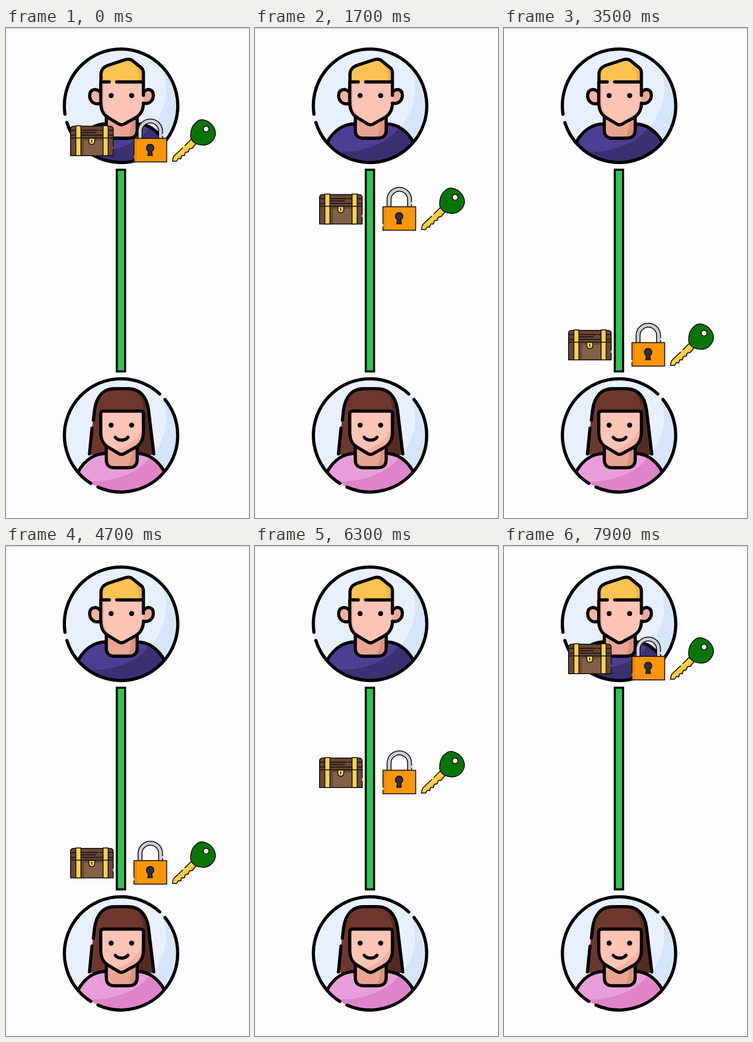
Write an HTML page that moves like this. It is 527 by 1063 pixels and loops after 8000 ms.

```html
<!DOCTYPE html>
<html lang="en">
<head>
<meta charset="utf-8">
<title>Chest, lock and key exchange</title>
<style>
  html, body { margin: 0; width: 100%; height: 100%; overflow: hidden; background: #fefcff; }
  svg { display: block; width: 100%; height: 100%; }
  .ink { fill: none; stroke: #000; stroke-width: 6.9; stroke-linecap: round; stroke-linejoin: round; }
  .thin { fill: none; stroke: #15100f; stroke-width: 2; stroke-linecap: round; stroke-linejoin: round; }
</style>
</head>
<body>
<svg viewBox="0 0 527 1063">
  <defs>
    <clipPath id="disc"><circle cx="249.5" cy="168.5" r="123"/></clipPath>
    <path id="shirt" d="M157 247C172 220 194 208 218 208H284C308 208 329 222 343 247L343 300H157Z"/>
    <clipPath id="shirtClip"><use href="#shirt"/></clipPath>
    <path id="face" d="M205.500 117H298V161C298 177 293 187 282 194L256 208.500Q250.500 211.500 245 208.500L221 194C210 187 205.500 177 205.500 161Z"/>
    <clipPath id="faceClip"><use href="#face"/></clipPath>
    <path id="neck" d="M217.500 190V222Q218 239 235 239H266Q284 239 284.500 222V190Z"/>
    <clipPath id="neckClip"><use href="#neck"/></clipPath>

    <g id="backdrop">
      <circle cx="249.5" cy="168.5" r="123" fill="#d7e5fa"/>
      <circle cx="222" cy="132" r="125" fill="#e8f0fe" clip-path="url(#disc)"/>
    </g>
    <!-- Shirt colours come from fill (shade) and color (light) -->
    <g id="torso">
      <g clip-path="url(#disc)">
        <use href="#shirt"/>
        <g clip-path="url(#shirtClip)">
          <ellipse cx="208" cy="205" rx="112" ry="62" transform="rotate(-9 208 205)" fill="currentColor"/>
        </g>
      </g>
      <use href="#neck" fill="#e9a593"/>
      <path d="M262 240Q272 224 274 190H290V240Z" fill="#da927e" clip-path="url(#neckClip)"/>
      <path class="ink" d="M157 247C172 220 194 208 217.500 208M284.500 208C308 208 329 222 343 247M217.500 193V222Q218 239 235 239H266Q284 239 284.500 222V193"/>
    </g>
    <g id="eyes"><circle cx="228" cy="146.500" r="5.500"/><circle cx="272.500" cy="146.500" r="5.500"/></g>
  </defs>

  <rect width="527" height="1063" fill="#fefcff"/>
  <rect width="527" height="1" fill="#b4b3b6"/>

  <g id="man">
    <use href="#backdrop"/>
    <use href="#torso" fill="#3b3172" color="#4b3e93"/>
    <path d="M204 139C196 130 181.500 132 181.500 147C181.500 160 193 168 205 163Z" fill="#f3b4a6"/>
    <path d="M299 139C306 130 319.500 132 319.500 146C319.500 158 310 166 298 163Z" fill="#eda899"/>
    <use href="#face" fill="#fec4b6"/>
    <path d="M205 117H212V160C212 180 222 194 246 208L200 212Z" fill="#f1ae9f" clip-path="url(#faceClip)"/>
    <path d="M206 117V101C206 90 212 85 221 81L258 69Q269 65 277 73L293 86Q298 90 298 98V117Z" fill="#fcc353"/>
    <path d="M266 67L277 73L293 86Q298 90 298 98V117H288C290 98 283 80 266 67Z" fill="#efb345"/>
    <path class="ink" d="M224 117H206V101C206 90 212 85 221 81L258 69Q269 65 277 73L293 86Q298 90 298 98V146M240 117H298
      M205.500 117V161C205.500 177 210 187 221 194L245 208.500Q250.500 211.500 256 208.500L282 194C293 187 298 177 298 163
      M204 139C196 130 181.500 132 181.500 147C181.500 160 193 168 205 163M299 139C306 130 319.500 132 319.500 146C319.500 158 310 166 298 163"/>
    <use href="#eyes"/>
    <path class="ink" d="M127.900 187A123 123 0 1 1 132 205"/>
  </g>

  <rect x="240.250" y="307.500" width="18" height="437.500" fill="#2dc653" stroke="#000" stroke-width="4.500"/>

  <g id="woman" transform="translate(0 715)">
    <use href="#backdrop"/>
    <path d="M180 211L187 150L191 117C194 84 211 67.500 236 67.500H264C290 67.500 305 84 309 113L321 211Z" fill="#6d372d"/>
    <path d="M278 68C296 72 306 88 309 113L321 211H282L298 160V118C298 98 290 80 278 68Z" fill="#572b22"/>
    <use href="#torso" fill="#df84c9" color="#e89fd9"/>
    <use href="#face" fill="#fec4b6"/>
    <path d="M298 140C293 168 274 190 240 200L250 214L300 190Z" fill="#f4b1a2" clip-path="url(#faceClip)"/>
    <path class="ink" d="M189.500 136L192 114C196 84 211 67.500 236 67.500H264C290 67.500 305 84 309 113L320.500 209M186.500 153L181 209
      M205.500 122Q205.500 116 212 116H292Q298 116 298 122V161C298 177 293 187 282 194L256 208.500Q250.500 211.500 245 208.500L221 194C210 187 205.500 177 205.500 161Z
      M237 173C243 181 258 181 264.500 173"/>
    <use href="#eyes"/>
    <path class="ink" d="M344.800 91A123 123 0 0 1 199.500 281M184 273A123 123 0 1 1 333.500 79"/>
  </g>

  <g id="cargo">
    <g id="chest">
      <path d="M140 238.500V220Q140 213 147 213H225Q232.500 213 232.500 220V238.500Z" fill="#694635"/>
      <path d="M140 238.500H232.500V277H140Z" fill="#83604a"/>
      <path d="M140 239H151V277H140ZM163 239H169V277H163ZM222 239H232V277H222Z" fill="#6b4938"/>
      <path d="M163 239H210V244H163Z" fill="#6b4938"/>
      <path class="thin" d="M140 277V220Q140 213 147 213H225Q232.500 213 232.500 220V256M232.500 263V277H140M140 238.500H232.500M141 232.500H232M164 222H199M204 222H209M164 227H194M141 222H150M222 222H231"/>
      <path d="M151.500 212H162.500V277H151.500ZM210.500 212H221.500V277H210.500Z" fill="#fbd352"/>
      <path class="thin" d="M151.500 212H162.500V277H151.500ZM210.500 212H221.500V277H210.500ZM151.500 238.500H162.500M210.500 238.500H221.500"/>
      <path class="thin" d="M179.500 239H192.500V246Q192 252.500 186 252.500Q180 252.500 179.500 246Z" style="fill:#fbd352"/>
      <path class="thin" d="M186 243V247.500"/>
    </g>

    <g id="lock">
      <path class="thin" d="M286.500 240V224A26.500 26.500 0 0 1 339.500 224V240H331V224A18 18 0 0 0 295 224V240Z" style="fill:#c9cfd5"/>
      <path d="M338.500 230H341.500V234H338.500Z" fill="#fefcff"/>
      <path d="M277.500 239.500H348.500V290.500H277.500Z" fill="#f89605"/>
      <path d="M278 240H284V290H278Z" fill="#e98b02"/>
      <path class="thin" d="M277.500 276V239.500H348.500V290.500H277.500V283"/>
      <path class="thin" d="M309 267.500A8 8 0 1 1 316 267.500L317.500 276.500H307.500Z" style="fill:#2f2e42"/>
    </g>

    <g id="key">
      <path d="M403 240L363 279L361 289H370L374 283L379 284L381 277L387 277L389 270L395 269L398 262L404 261L413 250Z" fill="#fbd03f"/>
      <path d="M410 249L366 289H370L374 283L379 284L381 277L387 277L389 270L395 269L398 262L404 261L413 250Z" fill="#eab42d"/>
      <path class="thin" d="M403 240L388 255M383 260L365 277Q362 280 361 289H370L374 283L379 284L381 277L387 277L389 270L395 269L398 262L404 261L413 250"/>
      <path class="thin" d="M413 204C420 197 430 198 440 204C450 211 455.500 222 454 232C451 245 440 254 428 254C412 254 402 246 400.500 236C400 222 404 211 413 204Z" style="fill:#067506"/>
      <circle class="thin" cx="434" cy="219" r="6.200" style="fill:#fefcff"/>
    </g>
  </g>
</svg>
<script>
  const LOOP = 8000, STEP = 100, TRAVEL = 3000;
  const DROP = 443, DOWN_AT = 495, UP_AT = 4900;
  const cargo = document.getElementById('cargo');

  // Equivalent of CSS ease-in-out: cubic-bezier(.42, 0, .58, 1)
  function ease(x) {
    if (x <= 0) return 0;
    if (x >= 1) return 1;
    let lo = 0, hi = 1;
    for (let i = 0; i < 24; i++) {
      const s = (lo + hi) / 2, r = 1 - s;
      if (1.26 * s * r * r + 1.74 * s * s * r + s * s * s < x) lo = s;
      else hi = s;
    }
    return lo * lo * (3 - 2 * lo);
  }

  function draw() {
    const now = (performance.now() + 5) % LOOP;
    const t = Math.floor(now / STEP) * STEP;
    const y = DROP * (ease((t - DOWN_AT) / TRAVEL) - ease((t - UP_AT) / TRAVEL));
    cargo.setAttribute('transform', `translate(0 ${y.toFixed(2)})`);
    requestAnimationFrame(draw);
  }
  draw();
</script>
</body>
</html>
```
